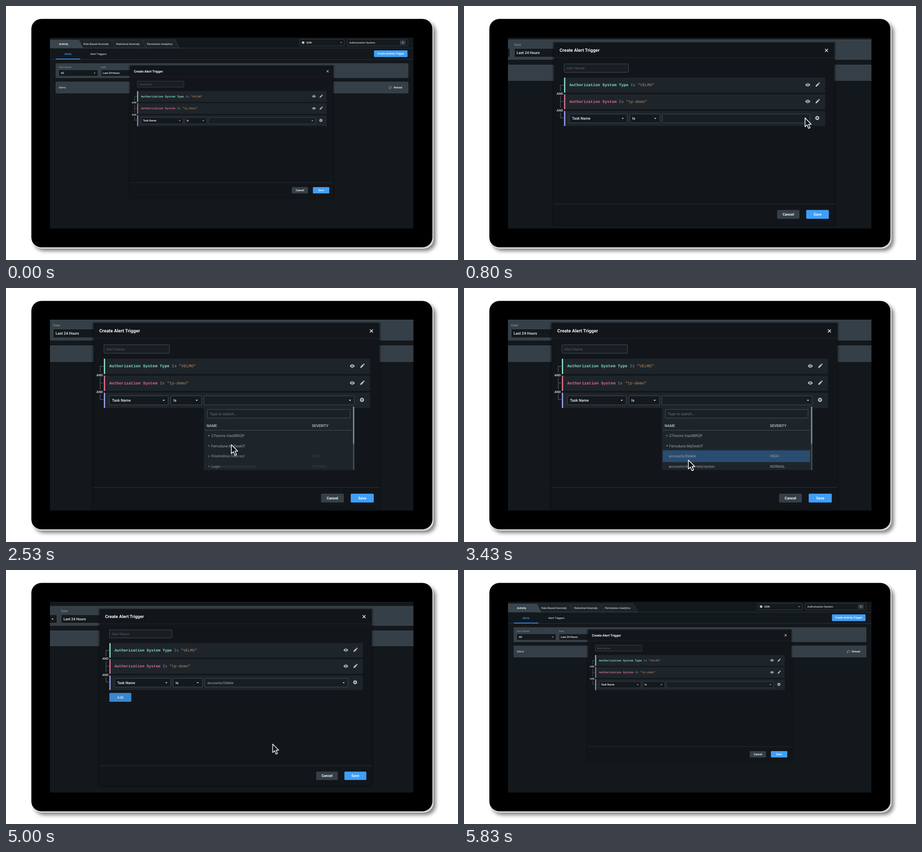
An HTML page that plays this animation: 998x561 px, repeating every 6.16 s.

```html
<!DOCTYPE html>
<html lang="en">
<head>
<meta charset="utf-8">
<title>Create Alert Trigger</title>
<style>
html, body { margin: 0; width: 100%; height: 100%; overflow: hidden; background: #fff; }
svg { display: block; width: 100vw; height: 100vh; }
text { font-family: Roboto, "Open Sans", sans-serif; text-rendering: geometricPrecision; white-space: pre; }
.mono { font-family: "Liberation Mono", monospace; }
</style>
</head>
<body>
<svg id="stage" viewBox="0 0 998 561" xmlns="http://www.w3.org/2000/svg">
  <defs>
    <clipPath id="screen"><rect x="97" y="70" width="802.5" height="421.5"/></clipPath>
    <clipPath id="panel"><rect x="436" y="260" width="336" height="142"/></clipPath>
    <filter id="soft" x="-10%" y="-10%" width="120%" height="120%"><feGaussianBlur stdDeviation="4"/></filter>
  </defs>
  <rect x="62" y="36" width="887" height="505" rx="22" fill="#000" opacity=".5" filter="url(#soft)"/>
  <rect x="57" y="29" width="887" height="507" rx="22" fill="#d9d9d9"/>
  <rect x="56" y="28.5" width="885.5" height="504.5" rx="22" fill="#000"/>
  <g clip-path="url(#screen)">
    <rect x="97" y="70" width="803" height="422" fill="#13181c"/>
    <g id="camera"></g>
    <g id="drop" clip-path="url(#panel)"></g>
    <g id="cursor">
      <path d="M0 0V14L3.2 11L5.7 16.7L8.1 15.6L5.7 10.1H10Z" fill="#0d1013" stroke="#fff" stroke-width="1.1" stroke-linejoin="round"/>
    </g>
  </g>
</svg>
<script>
const $ = id => document.getElementById(id);
const WHITE = '#f4f6f7', SOFT = '#c3c9cd', MUTED = '#8b959c', BLUE = '#409ff8',
      EDGE = '#465159', DARK = '#14191d', SLATE = '#353f47';

// markup helpers
const rect = (x, y, w, h, fill, extra = '') =>
  `<rect x="${x}" y="${y}" width="${w}" height="${h}" fill="${fill}" ${extra}/>`;
const path = (d, extra = '') => `<path d="${d}" ${extra}/>`;
const line = (d, color = EDGE, w = .7) => path(d, `fill="none" stroke="${color}" stroke-width="${w}"`);
const text = (x, mid, str, fill = WHITE, size = 5.9, weight = 500, extra = '') =>
  `<text x="${x}" y="${mid + size * .355}" fill="${fill}" font-size="${size}" font-weight="${weight}" ${extra}>${str}</text>`;
const caret = (x, y, r = 1.7, fill = WHITE) =>
  path(`M${x - r} ${y - r / 2}h${2 * r}l${-r} ${r}z`, `fill="${fill}"`);
const rightCaret = (x, y, r = 2) => path(`M${x} ${y - r}v${2 * r}l${r * 1.3} ${-r}z`, `fill="${MUTED}"`);
const group = (id, body) => `<g id="${id}">${body}</g>`;
const box = (x, y, w, h, fill = DARK) => rect(x, y, w, h, fill, `rx="1.2" stroke="${EDGE}" stroke-width=".7"`);
const button = (x, y, w, h, label, fill = BLUE) =>
  rect(x, y, w, h, fill, 'rx="1.4"') +
  text(x + w / 2, y + h / 2, label, WHITE, 5.9, 700, 'text-anchor="middle"');

function tabs() {
  const tab = (x, end, fill, stroke) =>
    path(`M${x} 93V74.5H${end}q2 0 3 2l8 16.5z`, `fill="${fill}" stroke="${stroke}" stroke-width=".7"`);
  return rect(97, 70, 803, 23, '#13181c') +
    [[303, 372], [234, 299], [160, 231]].map(([a, b]) => tab(a, b, '#1d2429', '#39434a')).join('') +
    tab(96, 159, '#3a454d', '#3a454d') +
    line('M97 93H900', '#39434a') +
    text(117, 83.5, 'Activity', WHITE, 5.9, 700) +
    text(171, 83.5, 'Rule-Based Anomaly', SOFT, 6) +
    text(243, 83.5, 'Statistical Anomaly', SOFT, 6) +
    text(311, 83.5, 'Permission Analytics', SOFT, 6);
}

function page() {
  return tabs() +
    box(648.5, 73.5, 98.5, 14.5) + rect(653.5, 78.3, 5, 5, SOFT) +
    text(663, 81, 'QVN') + caret(740, 81) +
    box(753.5, 73.5, 134, 14.5) + text(758, 80.5, 'Authorization System', SOFT) +
    rect(870, 76, 12.5, 9.5, SLATE, 'rx="1"') + text(876.2, 81, '1', WHITE, 5.9, 500, 'text-anchor="middle"') +
    text(137, 105.5, 'Alerts', BLUE, 5.9, 500, 'text-anchor="middle"') +
    text(186, 105.5, 'Alert Triggers', SOFT) +
    line('M97 118H900', '#343e46') + rect(110, 116.3, 54, 1.6, BLUE) +
    button(812.5, 98, 74, 14.7, 'Create Activity Trigger') +
    rect(110, 127, 778, 31.7, SLATE, `stroke="${EDGE}" stroke-width=".6"`) +
    text(116.5, 135, 'Alert Name', MUTED, 5.5, 400) + text(209.7, 135, 'Date', MUTED, 5.5, 400) +
    box(116.5, 141, 86.5, 14) + text(121, 148, 'All') + caret(195.7, 148.3) +
    box(210, 141, 86.5, 14) + text(213.8, 148, 'Last 24 Hours') +
    rect(110, 167.5, 778, 25, SLATE, `stroke="${EDGE}" stroke-width=".6"`) +
    text(116.5, 180, 'Alerts', SOFT) +
    line('M847 182.4a2.8 2.8 0 1 1 4.6-.7M846 180.4l1 2.2 2-.9', SOFT, .7) +
    text(856.3, 180, 'Reload', WHITE, 5.9, 500);
}

const eye = (x, y) =>
  path(`M${x - 4} ${y}q4-5.4 8 0q-4 5.4-8 0z`, `fill="${SOFT}"`) +
  `<circle cx="${x}" cy="${y}" r="1.7" fill="#1e252a"/><circle cx="${x}" cy="${y}" r=".9" fill="${SOFT}"/>`;
const pencil = (x, y) =>
  path(`M${x - 3} ${y + 3}l.4-2 3.7-3.7 1.6 1.6-3.7 3.7zM${x + 1.6} ${y - 3.2}l.7-.6q.5-.3 1 .1l.5.5q.4.5 0 1l-.6.6z`, `fill="${SOFT}"`);

function ruleRow(y, color) {
  return rect(289.6, y, 418.4, 24, '#1e252a') + rect(289.6, y, 2, 24, color);
}

function rule(mid, color, key, value) {
  const body = `<tspan fill="${color}" font-weight="700">${key}</tspan> Is <tspan fill="#c08d63">"${value}"</tspan>`;
  return ruleRow(mid - 11.5, color) + text(298.2, mid, body, MUTED, 6.31, 400, 'class="mono"') +
    eye(680, mid) + pencil(695.5, mid);
}

function modal() {
  const and = y => text(283, y, 'AND', SOFT, 5.1, 700, 'text-anchor="middle"');
  return rect(270, 129, 456, 298, '#000', 'opacity=".1" rx="4"') +
    rect(271.5, 130.5, 453, 294, '#000', 'opacity=".15" rx="3"') +
    rect(273.2, 131.6, 449.8, 291.4, '#12161a', 'rx="1.5"') +
    text(282.5, 144, 'Create Alert Trigger', WHITE, 7.2, 700) +
    line('M707.7 141.8l4.8 4.8m0-4.8l-4.8 4.8', WHITE, 1) +
    line('M273.2 156H723', '#262d33', .6) +
    box(289.8, 165.9, 103, 13.4, '#181e22') + text(293.4, 172.7, 'Alert Name', '#535e65', 5.8, 400) +
    rule(199.4, '#86dfc4', 'Authorization System Type', 'VELMO') +
    rule(226, '#dd6f8c', 'Authorization System', 'tp-demo') +
    ruleRow(241.3, '#9a9ded') +
    box(298.2, 246.2, 92.6, 14.2) + text(302.4, 253.4, 'Task Name') + caret(383.7, 253.4) +
    box(394.9, 246.2, 48.3, 14.2) + text(398.9, 253.4, 'Is') + caret(435.6, 253.4) +
    box(447, 246.2, 236.3, 14.2, '#181e22') + caret(676.4, 253.4) +
    `<circle cx="695.3" cy="252.6" r="3.2" fill="${SOFT}"/>` +
    line('M693.5 252.6h3.6m-1.8-1.8v3.6', '#1e252a', .9) +
    line('M289 199.8H284V209.5M284 217.5V236M284 226H289M284 244V252.2H289', '#5b656c', .8) +
    and(213.4) + and(240) +
    line('M273.2 390.2H723', '#2d353b', .7) +
    button(631, 400, 35.8, 14, 'Cancel', SLATE) + button(677.6, 400, 36.2, 14, 'Save') +
    group('picked', text(451.2, 253.4, 'accounts/Delete', SOFT, 5.9, 400)) +
    group('add', button(289.6, 270.2, 36.2, 14.6, 'Add'));
}

function dropdown() {
  const row = (x, y, str, severity = '') =>
    text(x, y, str, '#9aa2a7', 8.2, 400) + text(675.5, y, severity, '#9aa2a7', 8.2, 400);
  return group('back',
      rect(437, 262, 333, 141, '#1e252a') +
      rect(766, 262, 3, 140, '#414a51') + rect(766, 262, 3, 82, '#7b848a')) +
    group('hot', rect(438.7, 358.5, 325.3, 26, '#2c5078')) +
    group('list',
      rect(444.5, 268.3, 315, 19, '#1a2025', `rx="1.5" stroke="${EDGE}"`) +
      text(450, 278, 'Type to search...', '#67727a', 8.2, 400) +
      text(443, 304, 'NAME', SOFT, 8.1) + text(675.5, 304, 'SEVERITY', SOFT, 8.1) +
      line('M438 314.3H764', '#475159', 1) +
      rightCaret(447, 326) + row(453, 326, '27looms.VaultBRQP') +
      row(453, 348.7, 'Ferrodune.MyDeskIT') +
      group('shut', rightCaret(447, 348.5) +
        rightCaret(447, 371.5) + row(453, 371.5, 'PineHollow.Telecast') +
        rightCaret(447, 394) + row(453, 394, 'Login')) +
      group('open', caret(448.5, 348.7, 2.4, MUTED) +
        row(452, 371.5, 'accounts/Delete', 'HIGH') +
        row(452, 394, 'accounts/listSecrets/action', 'NORMAL')));
}

$('camera').innerHTML = page() + modal();
$('drop').innerHTML = dropdown();

const LOOP = 6160, FRAME = 100 / 3;
const ramp = (t, a, b) => Math.min(1, Math.max(0, (t - a) / (b - a)));
const easeOut = p => 1 - (1 - p) ** 2;
const fade = (id, v) => $(id).setAttribute('opacity', v.toFixed(3));

// cursor legs in page units: start, end, target x, target y
const START = [903.5, 308];
const LEGS = [
  [333, 700, 675.7, 252.5],
  [1900, 2400, 490, 323],
  [3000, 3400, 488.5, 347.2],
  [4833, 5833, 911.5, 391.8]
];

function cursorAt(t) {
  let [x, y] = START;
  for (const [a, b, tx, ty] of LEGS) {
    const p = ramp(t, a, b);
    x += (tx - x) * p;
    y += (ty - y) * p;
  }
  return [x, y];
}

function draw(ms) {
  const t = Math.floor((ms + 3.4) / FRAME) * FRAME;
  const leave = ramp(t, 4833, 5833);
  const zoom = ramp(t, 333, 833) - leave;
  const view = `translate(${-190.9 * zoom} ${-107.8 * zoom}) scale(${1 + .405 * zoom})`;
  $('camera').setAttribute('transform', view);
  const [x, y] = cursorAt(t);
  $('cursor').setAttribute('transform', `${view} translate(${x} ${y})`);

  const show = ramp(t, 950, 1700), hide = ramp(t, 3650, 4510);
  const expand = ramp(t, 2450, 2830);
  const shell = easeOut(show) * (1 - hide ** 1.6);
  fade('back', shell);
  fade('list', show ** 1.6 * (1 - hide));
  fade('shut', 1 - expand);
  fade('open', expand);
  fade('hot', easeOut(ramp(t, 3000, 3633)) * (1 - hide ** 2.2));
  fade('picked', ramp(t, 3650, 4300) * (1 - leave));
  fade('add', ramp(t, 3650, 4480) * (1 - leave));
}

const born = performance.now();
function tick() {
  draw((performance.now() - born) % LOOP);
  requestAnimationFrame(tick);
}
tick();
</script>
</body>
</html>
```
